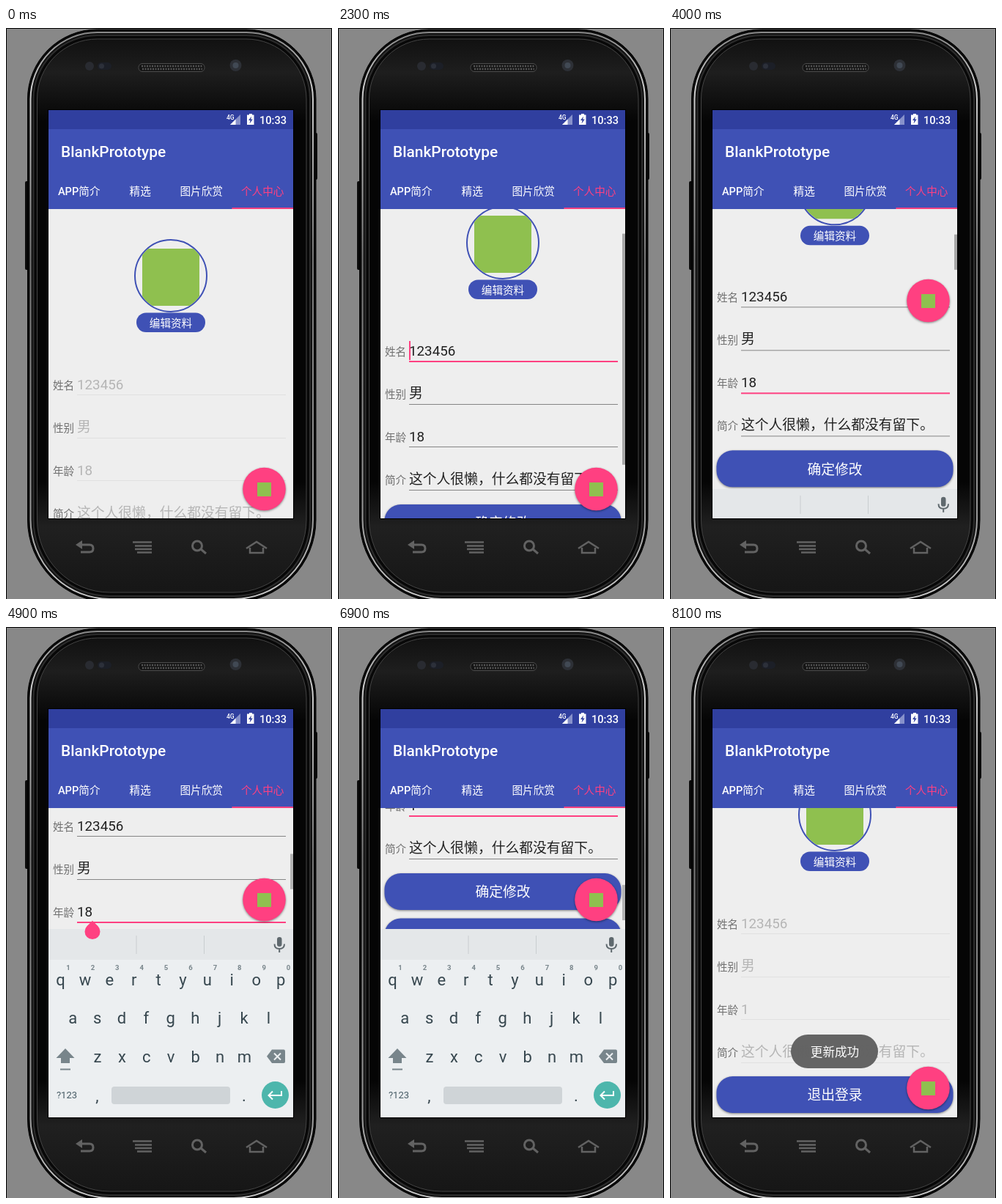
These frames come from a looping animation (445x779 px, 8800 ms). An HTML page:

```html
<!DOCTYPE html>
<html lang="zh-CN">
<head>
<meta charset="utf-8">
<style>
  html, body { margin: 0; height: 100%; overflow: hidden; background: #888; }
  svg { display: block; width: 445px; height: 779px; }
  text { font-family: Roboto, "Noto Sans CJK SC", "Noto Sans CJK", sans-serif; font-size: 14.6px; white-space: pre; }
  .mid { text-anchor: middle; }
  .medium { font-weight: 500; }
  .white { fill: #fff; }
  .blue { fill: #3f51b5; }
  .pink { fill: #ff4081; }
  .green { fill: #8fc04f; }
  .label { fill: #707070; }
  .big { font-size: 18.8px; }
  .raised { filter: drop-shadow(0 1.5px 1.5px #0007); }
  .key { font-size: 22px; fill: #37474f; }
  .hint { font-size: 9.5px; font-weight: 700; fill: #78858b; }
</style>
</head>
<body>
<svg viewBox="0 0 445 779">
  <defs>
    <clipPath id="screenClip"><rect x="58" y="112" width="334" height="557"/></clipPath>
    <clipPath id="pageClip"><rect x="58" y="247" width="334" height="422"/></clipPath>
    <clipPath id="avatarClip"><circle cx="225" cy="338" r="48"/></clipPath>
    <linearGradient id="face" x2="0" y2="1">
      <stop offset="0" stop-color="#111"/><stop offset=".06" stop-color="#1e1e1e"/>
      <stop offset=".15" stop-color="#050505"/><stop offset=".8" stop-color="#050505"/>
      <stop offset=".88" stop-color="#202020"/><stop offset="1" stop-color="#161616"/>
    </linearGradient>
    <linearGradient id="rim" x2="0" y2="1">
      <stop offset="0" stop-color="#888"/><stop offset=".1" stop-color="#d0d0d0"/>
      <stop offset=".4" stop-color="#777"/><stop offset=".85" stop-color="#999"/><stop offset="1" stop-color="#ccc"/>
    </linearGradient>
  </defs>

  <rect width="445" height="779" fill="#888"/>
  <path d="M.5 779V.5H444.5V779" fill="none" stroke="#000"/>
  <rect x="26" y="209" width="6" height="121" rx="2" fill="#0b0b0b"/>
  <rect x="420" y="143" width="5" height="64" rx="2" fill="#0b0b0b"/>
  <g id="shell"></g>
  <rect x="57" y="111" width="336" height="559"/>

  <circle cx="114" cy="52" r="6" fill="#292b31"/>
  <rect x="125" y="47" width="19" height="10" rx="5" fill="#1c1f27"/>
  <circle cx="130.5" cy="52" r="3.5" fill="#2c303a"/>
  <circle cx="313.5" cy="51" r="8" fill="#2d3036"/>
  <circle cx="313.5" cy="51" r="4" fill="#414954"/>
  <rect x="181" y="48.5" width="90" height="11" rx="5" fill="#151515" stroke="#4c4c4c"/>
  <path d="M185 52H268M186 56H268" stroke="#555" stroke-width="2.5" stroke-dasharray="2 1.5"/>

  <g fill="none" stroke="#626262" stroke-width="3">
    <path d="M101 705H114Q119 705 119 710T114 715H102"/>
    <path d="M95 705L104 699V711Z" fill="#626262" stroke="none"/>
    <path d="M173 701.5H199M176 706.5H199M176 711H199M179 715.5H199" stroke-width="2.5"/>
    <circle cx="261" cy="706.5" r="6.5"/><path d="M266 711L273 717"/>
    <path d="M328 710L342 701L356 710M333 709V716H351V709" stroke-width="2.5"/>
  </g>

  <g clip-path="url(#screenClip)">
    <rect x="58" y="112" width="334" height="557" fill="#eee"/>

    <g clip-path="url(#pageClip)">
      <g id="page">
        <circle cx="225" cy="338" r="49" fill="#eee" stroke="#3f51b5" stroke-width="2"/>
        <rect class="green" x="186" y="301" width="78" height="78" clip-path="url(#avatarClip)"/>
        <rect class="blue" x="178" y="388.5" width="94" height="26.5" rx="13.2"/>
        <text class="mid medium white" x="225" y="407.5">编辑资料</text>
        <g id="form">
          <g id="rows"></g>
          <rect id="cursor" class="pink" width="2" height="26"/>
        </g>
        <g id="confirm">
          <rect class="blue raised" x="63.5" y="695" width="323" height="50" rx="22"/>
          <text class="mid white big" x="225" y="727.3">确定修改</text>
        </g>
        <g id="logout">
          <rect class="blue raised" x="63.5" y="695" width="323" height="50" rx="22"/>
          <text class="mid white big" x="225" y="727.3">退出登录</text>
        </g>
      </g>
      <rect id="scrollbar" x="388" width="4" fill="#a8a8a8"/>
    </g>

    <rect x="58" y="112" width="334" height="26.5" fill="#303f9f"/>
    <rect class="blue" x="58" y="138" width="334" height="109"/>
    <text class="white medium" x="301" y="124.5" style="font-size:8.5px">4G</text>
    <path d="M320 118V132H306Z" fill="#8791cb"/>
    <path d="M313.5 124.5V132H306Z" fill="#fff"/>
    <path d="M332 117H336V118.500H338.500V132H329V118.500H332Z" fill="#fff"/>
    <path d="M335 120.5L331 126H333.5L332.5 130.5L336.8 124.5H334.2Z" fill="#303f9f"/>
    <text class="white medium" x="346" y="131">10:33</text>
    <text class="white medium" x="75" y="175.5" style="font-size:20.9px">BlankPrototype</text>
    <g id="tabs" class="mid medium"></g>
    <rect class="pink" x="308.5" y="245" width="84" height="2"/>

    <g id="fab">
      <circle class="pink raised" cx="352.5" cy="629" r="29.3"/>
      <rect class="green" x="343" y="620" width="19" height="19"/>
    </g>

    <g id="keyboard">
      <rect x="58" y="412" width="334" height="257" fill="#eceff1"/>
      <rect x="58" y="412" width="334" height="42" fill="#e4e7e9"/>
      <path d="M178 421V446M270.5 421V446" stroke="#c9cdd0"/>
      <rect x="370" y="423" width="6.5" height="13" rx="3.2" fill="#5f696e"/>
      <path d="M366.5 432.5Q366.5 439 373.2 439T380 432.5M373.2 439V444" fill="none" stroke="#5f696e" stroke-width="2"/>
      <g id="keys"></g>
      <path d="M81 575L93.5 588H87V595H75V588H68.5Z" fill="#78858b"/>
      <path d="M74 603.5H88" stroke="#78858b" stroke-width="2"/>
      <path d="M363 576.5H379Q381 576.5 381 578.5V593Q381 595 379 595H363L356 585.8Z" fill="#78858b"/>
      <path d="M366 581.5L375 590.5M375 581.5L366 590.5" stroke="#eceff1" stroke-width="2"/>
      <text class="mid" x="83" y="643" style="font-size:13px" fill="#455a64">?123</text>
      <rect x="144" y="627" width="162" height="24" rx="4" fill="#cfd4d7"/>
      <circle cx="367.5" cy="638.5" r="18.5" fill="#4db6ac"/>
      <path d="M376 633V639H359M364 633.5L358.5 639L364 644.5" fill="none" stroke="#fff" stroke-width="2"/>
    </g>
    <path id="handle" class="pink" d="M118 400.7L125.4 408.1A10.5 10.5 0 1 1 110.6 408.1Z"/>

    <g id="toast">
      <rect x="165" y="556" width="119" height="46" rx="23" fill="#606060" fill-opacity=".97"/>
      <text class="mid white" x="225" y="585.8" style="font-size:16.6px">更新成功</text>
    </g>
  </g>
</svg>

<script>
const $ = id => document.getElementById(id);
const label = (x, y, text, cls) => `<text x="${x}" y="${y}" class="${cls}">${text}</text>`;

// Phone outline: upper corners are tighter than the lower ones.
function outline(inset, fill, stroke, width) {
  const left = 29.5 + inset, right = 423 - inset, top = 2 + inset, bottom = 783 - inset;
  const upper = 95 - inset, lower = 112 - inset;
  const corner = (r, x, y) => `A${r} ${r} 0 0 1 ${x} ${y}`;
  return `<path fill="${fill}" stroke="${stroke}" stroke-width="${width}" d="M${left} ${top + upper}
    ${corner(upper, left + upper, top)}H${right - upper}${corner(upper, right, top + upper)}V${bottom - lower}
    ${corner(lower, right - lower, bottom)}H${left + lower}${corner(lower, left, bottom - lower)}Z"/>`;
}
$('shell').innerHTML = outline(0, '#0a0a0a', '#000', 1) + outline(4, '#111', 'url(#rim)', 2)
  + outline(8, '#080808', '#2c2c2c', 2) + outline(13, 'url(#face)', '#444', 1);

$('tabs').innerHTML = ['APP简介', '精选', '图片欣赏', '个人中心']
  .map((name, i) => label(99.7 + 83.5 * i, 227.5, name, i === 3 ? 'pink' : 'white')).join('');

const fields = [['姓名', '123456'], ['性别', '男'], ['年龄', '18'], ['简介', '这个人很懒，什么都没有留下。']];
const rowPitch = 58.5;
$('rows').innerHTML = fields.map(([name, value], i) => {
  const y = 492.5 + rowPitch * i;
  return label(64, y, name, 'label') + label(97, y, value, 'big value')
    + `<rect class="line" x="97" y="${Math.round(500 + rowPitch * i)}" width="285"/>`;
}).join('');
const values = [...document.querySelectorAll('.value')];
const lines = [...document.querySelectorAll('.line')];

const keyPitch = 33.4;
const keyRow = (chars, x, y, cls = 'mid key') =>
  [...chars].map((c, i) => label(x + keyPitch * i, y, c, cls)).join('');
$('keys').innerHTML = keyRow('qwertyuiop', 74.5, 488.5) + keyRow('asdfghjkl', 91.2, 541)
  + keyRow('zxcvbnm', 125, 594) + keyRow(',', 124.5, 647) + keyRow('.', 325, 647)
  + keyRow('1234567890', 85, 468, 'mid hint');

const EDIT = 1300, TAP = 4000, ERASE = 5200, SAVE = 7400;
const frameStep = 100;
const within = (t, from, to) => t >= from && t < to;
const progress = (t, start, duration) => Math.min(1, Math.max(0, (t - start) / duration));
const smooth = (...span) => { const p = progress(...span); return p * p * (3 - 2 * p); };
const fling = (...span) => 1 - (1 - progress(...span)) ** 5;

const scrolled = t => 90 * smooth(t, 2100, 400) + 11 * smooth(t, 2600, 300) + 113 * smooth(t, TAP - 100, 400)
  + 11 * smooth(t, 5500, 500) + 134 * fling(t, 6100, 500);
const barOpacity = t => {
  const shown = (from, fadeAt) => t < from ? 0 : 1 - progress(t, fadeAt, 300);
  return Math.max(shown(2200, 3200), shown(TAP, 4850), shown(5600, 6850));
};
const blinkOn = t => {
  const start = t < TAP ? EDIT : t < ERASE ? TAP - 450 : ERASE;
  return Math.floor((t - start) / 450) % 2 === 0;
};

const set = (el, attrs) => Object.entries(attrs).forEach(([name, value]) => el.setAttribute(name, value));
const show = (id, visible) => set($(id), { visibility: visible ? 'visible' : 'hidden' });
const shift = (id, y) => set($(id), { transform: `translate(0 ${y})` });

function draw(t) {
  const editing = within(t, EDIT, SAVE);
  const typing = within(t, TAP, SAVE + 100);
  const focus = t < TAP ? 0 : 2;
  const viewHeight = typing ? 165 : 422;
  const contentHeight = editing ? 565 : 504;
  const scroll = Math.min(scrolled(t), contentHeight - viewHeight);

  shift('page', -scroll);
  shift('form', editing ? -1 : 0);
  shift('logout', editing ? 61.5 : 0);
  shift('fab', typing ? -257 : 0);
  shift('keyboard', 257 * (1 - smooth(t, TAP - 100, 400) + smooth(t, SAVE, 300)));
  show('confirm', editing);
  show('handle', within(t, TAP + 300, ERASE));
  show('cursor', editing && blinkOn(t));
  set($('toast'), { opacity: progress(t, SAVE + 100, 600) });

  values.forEach(value => set(value, { fill: editing ? '#212121' : '#b5b5b5' }));
  values[2].textContent = t < ERASE ? '18' : '1';
  lines.forEach((line, i) => {
    const focused = editing && i === focus;
    set(line, { fill: focused ? '#ff4081' : editing ? '#858585' : '#e0e0e0', height: focused ? 2 : 1 });
  });
  set($('cursor'), { x: focus === 0 ? 97 : t < ERASE ? 117.5 : 107, y: 473 + rowPitch * focus });

  const thumb = viewHeight ** 2 / contentHeight;
  const y = 247 + scroll * (viewHeight - thumb) / (contentHeight - viewHeight);
  set($('scrollbar'), { y, height: thumb, opacity: barOpacity(t) });
}

function tick() {
  const t = performance.now() % 8800;
  draw(t - t % frameStep);
  requestAnimationFrame(tick);
}
tick();
</script>
</body>
</html>
```
